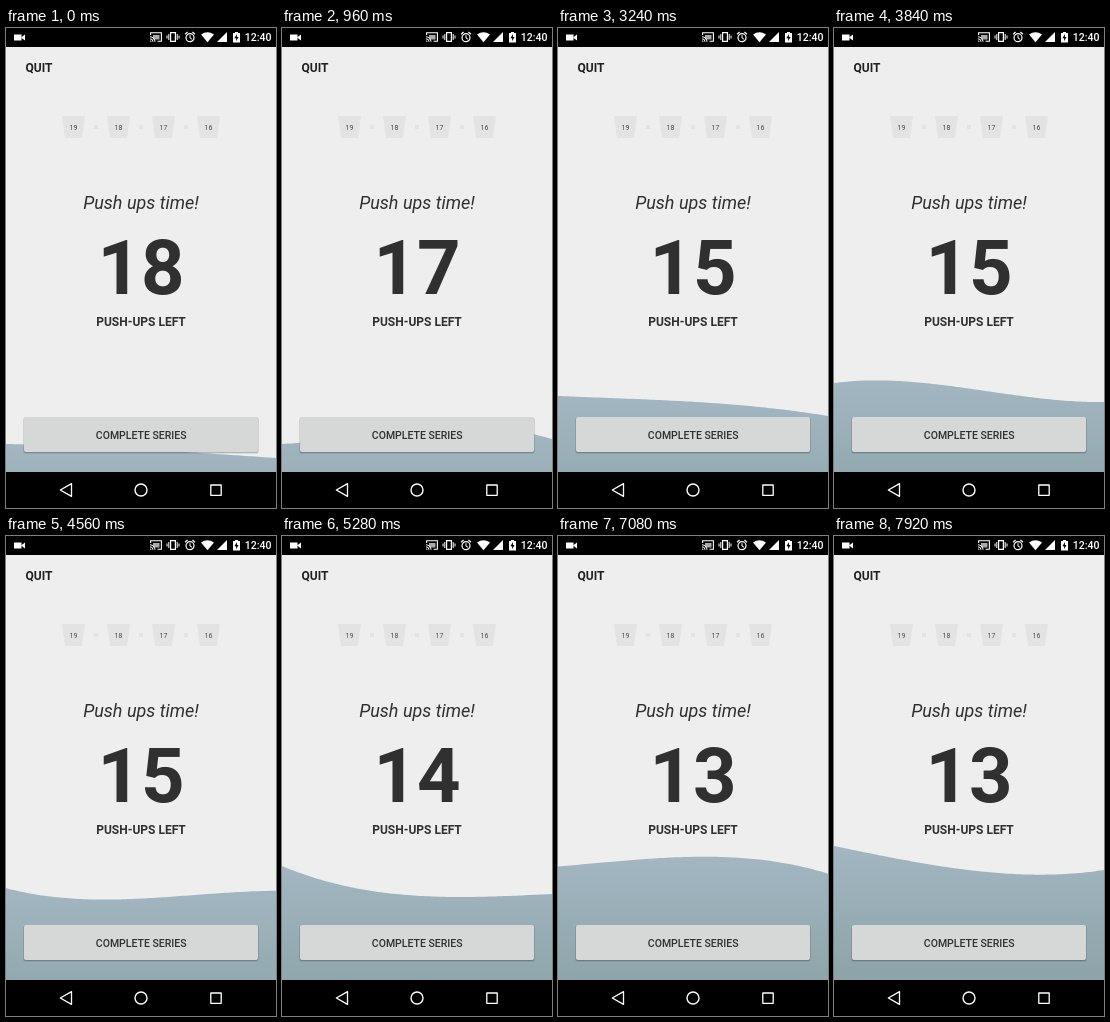
An HTML page with a canvas for the animation above (8000 ms loop, 270 px wide and 480 px high).

```html
<!DOCTYPE html>
<html lang="en">
<head>
<meta charset="utf-8">
<title>Push-up counter</title>
<style>
  html, body { margin: 0; width: 100%; height: 100%; overflow: hidden; background: #000; }
  canvas { display: block; width: 100vw; height: 100vh; }
</style>
</head>
<body>
<canvas id="stage"></canvas>
<script>
const W = 270, H = 480, LOOP = 8000, TICK = 120;
const INK = '#303030', WHITE = '#fff', PALE = '#e3e3e4';
const canvas = document.getElementById('stage');
const ctx = canvas.getContext('2d');

// Moments at which one more push-up is counted.
const REPS = [240, 1680, 3120, 4680, 6240];

// Water surface heights at four evenly spaced x positions.
const STEP = 90;
const LEVELS = [
  { t: 0, y: [416, 419, 424, 430] },
  { t: 1920, y: [390, 407, 408, 400] },
  { t: 3240, y: [368, 371.5, 377, 388] },
  { t: 3840, y: [355, 355, 367, 374] },
  { t: 5280, y: [330, 355, 361, 358] },
  { t: 6120, y: [325, 325, 336.5, 355] },
  { t: 7920, y: [310, 327.5, 338, 334] }
];

// Ripple travelling to the right.
const ripple = (x, t) => 12 * Math.cos(2 * Math.PI * ((t - 1900) / 3000 - (x - 90) / 450));

function surface(t) {
  let i = 0;
  while (i < LEVELS.length - 2 && t > LEVELS[i + 1].t) i++;
  const a = LEVELS[i], b = LEVELS[i + 1];
  const k = Math.min(1, (t - a.t) / (b.t - a.t));
  const [p, q, r, s] = a.y.map((ya, n) => {
    const x = n * STEP;
    const from = ya - ripple(x, a.t), to = b.y[n] - ripple(x, b.t);
    return from + (to - from) * k + ripple(x, t);
  });
  // Cubic through the four heights.
  const d1 = q - p, d2 = r - 2 * q + p, d3 = s - 3 * r + 3 * q - p;
  return x => {
    const u = x / STEP;
    return p + d1 * u + d2 * u * (u - 1) / 2 + d3 * u * (u - 1) * (u - 2) / 6;
  };
}

function rect(x, y, w, h, color) {
  ctx.fillStyle = color;
  ctx.fillRect(x, y, w, h);
}

function trace(points, closed = true) {
  ctx.beginPath();
  points.forEach(([x, y]) => ctx.lineTo(x, y));
  if (closed) ctx.closePath();
}

function poly(points, color) {
  trace(points);
  ctx.fillStyle = color;
  ctx.fill();
}

function line(points, width, closed = false) {
  trace(points, closed);
  ctx.lineWidth = width;
  ctx.stroke();
}

function arc(x, y, r, width, from = 0, to = 2 * Math.PI) {
  ctx.beginPath();
  ctx.arc(x, y, r, from, to);
  ctx.lineWidth = width;
  ctx.stroke();
}

function text(str, x, y, font, color = INK, align = 'center') {
  ctx.font = font + ' Roboto, sans-serif';
  ctx.textAlign = align;
  ctx.fillStyle = color;
  ctx.fillText(str, x, y);
}

function statusBar() {
  rect(0, 0, W, 19, '#000');
  ctx.strokeStyle = WHITE;

  // Recording
  rect(8, 6.5, 7.5, 6, WHITE);
  poly([[15, 9.5], [19, 6.5], [19, 12.5]], WHITE);

  // Cast
  line([[144.6, 7], [144.6, 4.8], [155.4, 4.8], [155.4, 13.3], [151.5, 13.3]], 1.1);
  rect(147, 7, 6.5, 4.5, '#aaa');
  for (const r of [1, 3, 5]) arc(144, 13.8, r, 1, -Math.PI / 2, 0);

  // Vibrate
  line([[164.6, 4.6], [169.4, 4.6], [169.4, 13.4], [164.6, 13.4]], 1.2, true);
  for (const side of [-1, 1]) {
    line([[167 + side * 4.2, 6], [167 + side * 4.2, 12]], 1);
    line([[167 + side * 6, 7.5], [167 + side * 6, 10.5]], 1);
  }

  // Alarm
  arc(184, 9.7, 4, 1.2);
  line([[184, 7.2], [184, 10], [186, 11.2]], 1);
  line([[179, 6.2], [181.6, 4]], 1.2);
  line([[189, 6.2], [186.4, 4]], 1.2);

  // Wi-Fi
  ctx.beginPath();
  ctx.moveTo(201.5, 14.2);
  ctx.lineTo(195, 6.5);
  ctx.quadraticCurveTo(201.5, 1.9, 208, 6.5);
  ctx.closePath();
  ctx.fillStyle = WHITE;
  ctx.fill();

  // Signal
  poly([[211, 14], [221, 4], [221, 14]], WHITE);

  // Battery
  rect(227, 5, 7, 9.5, WHITE);
  rect(229, 4, 3, 1.2, WHITE);
  poly([[231, 6], [228.4, 10.3], [230.2, 10.3], [230, 13.3], [232.6, 9], [230.9, 9]], '#000');

  text('12:40', 265.5, 13.3, '500 10.5px', WHITE, 'right');
}

function navBar() {
  rect(0, 444, W, 36, '#000');
  ctx.strokeStyle = WHITE;
  ctx.lineJoin = 'round';
  line([[54.3, 462], [65.5, 455.6], [65.5, 468.4]], 1.3, true);
  arc(135, 462, 6, 1.4);
  line([[204.8, 457], [215.2, 457], [215.2, 467.3], [204.8, 467.3]], 1.3, true);
  ctx.lineJoin = 'miter';
}

function seriesRow() {
  [19, 18, 17, 16].forEach((n, i) => {
    const x = 67.5 + i * 45;
    poly([[x - 11.5, 88], [x + 11.5, 88], [x + 8.5, 110], [x - 8.5, 110]], PALE);
    text(n, x, 101.6, '7px', '#4a4a4a');
    if (i < 3) rect(x + 20.5, 97, 4, 4, PALE);
  });
}

function water(t) {
  const y = surface(t), points = [];
  for (let x = 0; x <= W; x += 3) points.push([x, y(x)]);
  const top = Math.min(...points.map(p => p[1]));
  const fill = ctx.createLinearGradient(0, top, 0, top + 125);
  fill.addColorStop(0, '#a3b6c2');
  fill.addColorStop(1, '#8da5aa');
  poly([...points, [W, 444], [0, 444]], fill);
}

function button() {
  const box = (x, y, w, h, color) => {
    ctx.beginPath();
    ctx.roundRect(x, y, w, h, 2);
    ctx.fillStyle = color;
    ctx.fill();
  };
  box(17.3, 389.5, 235.4, 36.3, 'rgba(0,0,0,.1)');
  box(17.7, 389.5, 234.6, 35.4, 'rgba(0,0,0,.16)');
  box(18, 389, 234, 35, '#d6d7d7');
  text('COMPLETE SERIES', 135.2, 411, '500 10.5px');
}

function draw(t) {
  rect(0, 0, W, H, '#eee');
  water(t);
  text('QUIT', 19.5, 44.2, 'bold 12px', '#202020', 'left');
  seriesRow();
  text('Push ups time!', 135, 180.5, 'italic 18px');
  const left = 18 - REPS.filter(r => t >= r).length;
  text(left, 135, 265.5, 'bold 76px');
  text('PUSH-UPS LEFT', 135, 298, 'bold 12px');
  button();
  statusBar();
  navBar();
}

function frame(now) {
  const ratio = window.devicePixelRatio || 1;
  const w = Math.round(innerWidth * ratio), h = Math.round(innerHeight * ratio);
  if (canvas.width !== w || canvas.height !== h) {
    canvas.width = w;
    canvas.height = h;
  }
  ctx.setTransform(w / W, 0, 0, h / H, 0, 0);
  const t = (now - start) % LOOP;
  draw(Math.max(0, Math.floor(t / TICK) * TICK));
  requestAnimationFrame(frame);
}

const start = performance.now();
frame(start);
</script>
</body>
</html>
```
